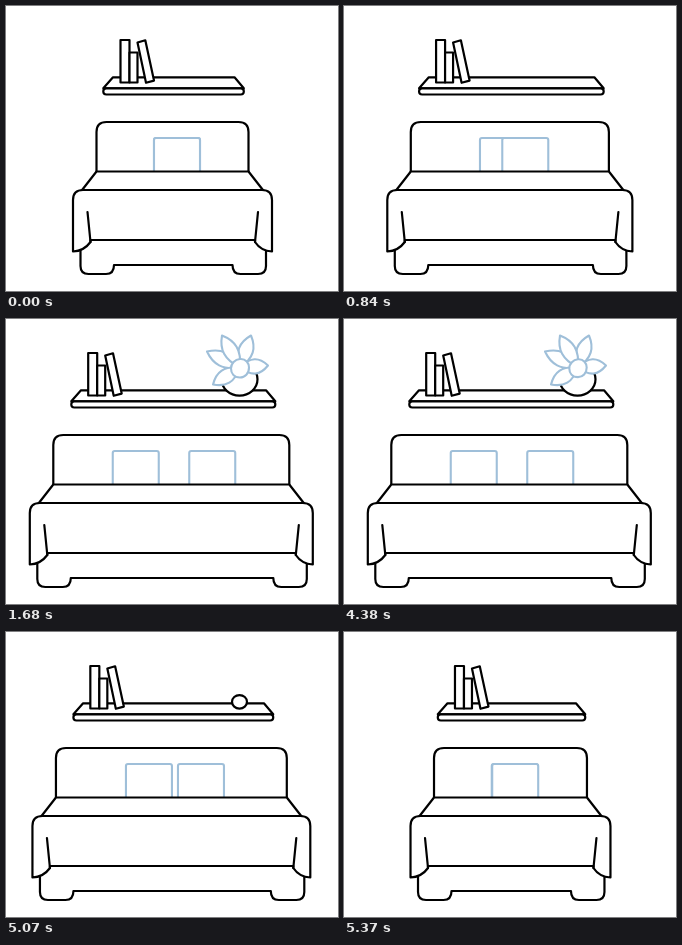
Write an HTML page that moves like this. It is 332 px wide and 285 px high and loops after 5400 ms.

```html
<!DOCTYPE html>
<html lang="en">
<head>
<meta charset="utf-8">
<title>Growing bed</title>
<style>
  html, body { margin: 0; height: 100%; overflow: hidden; background: #fff; }
  svg { display: block; width: 100%; height: 100%; }
  path, ellipse, rect { fill: #fff; stroke: #000; stroke-width: 2.2; stroke-linejoin: round; stroke-linecap: round; }
  .line { fill: none; }
  .blue { stroke: #9fbfd9; stroke-width: 2.1; }
</style>
</head>
<body>
<svg viewBox="0 0 332 285">
  <path id="shelf"/>
  <rect id="slab" y="82.3" height="6.2" rx="3"/>
  <g id="books">
    <path d="M114.5 34H123.5V76.5H114.5Z"/>
    <path d="M123.5 46.5H131.5V76.5H123.5Z"/>
    <path d="M131.5 36.5L139.3 34.3L148 74.6L140 76.8Z"/>
  </g>
  <ellipse id="pot" cx="233.5"/>
  <g id="plant"></g>
  <path id="head"/>
  <path id="left" class="blue" d="M-23 165V134Q-23 132 -21 132H21Q23 132 23 134V165"/>
  <path id="right" class="blue" d="M-23 165V134Q-23 132 -21 132H21Q23 132 23 134V165"/>
  <path id="mattress"/>
  <path id="base"/>
  <path id="cover"/>
  <path id="folds" class="line"/>
</svg>
<script>
const LOOP = 5400, STEP = 30, MIRROR = 6030;
const $ = id => document.getElementById(id);
const clamp = x => Math.min(1, Math.max(0, x));
const span = (t, start, length) => clamp((t - start) / length);
const inOut = p => p < .5 ? 2 * p * p : 1 - 2 * (1 - p) ** 2;
const sineOut = p => Math.sin(p * Math.PI / 2);
const draw = (id, d) => $(id).setAttribute('d', d);
const move = (el, x, y, rest = '') => el.setAttribute('transform', `translate(${x} ${y})${rest}`);

// Leaf tips relative to the heart of the plant, back to front
const leaves = [[-33, -16], [28, -2], [-27, 17], [11, -32], [-18, -32]].map(([x, y]) => {
  const size = Math.hypot(x, y), turn = Math.atan2(y, x) * 180 / Math.PI;
  return { turn, d: `M0 0C${size * .4} -10 ${size * .7} -9 ${size} 0C${size * .7} 9 ${size * .4} 10 0 0Z` };
});
leaves.push({ turn: 0, d: 'M0 -8.5C6 -9 9 -4 9 0C9 6 5 10 0 10C-6 10 -9 6 -9 1C-9 -4 -5 -8 0 -8.5Z' });
for (const leaf of leaves) {
  leaf.el = document.createElementNS('http://www.w3.org/2000/svg', 'path');
  leaf.el.setAttribute('class', 'blue');
  leaf.el.setAttribute('d', leaf.d);
  $('plant').append(leaf.el);
}

function drawBed(p) {
  const l = x => x - 43.2 * p, r = x => x + 40.8 * p;
  draw('head', `M${l(90.5)} 165.5V126Q${l(90.5)} 116 ${l(100.5)} 116H${r(232.5)}Q${r(242.5)} 116 ${r(242.5)} 126V165.5`);
  draw('mattress', `M${l(90.5)} 165.5H${r(242.5)}L${r(258.5)} 186H${l(74.5)}Z`);
  draw('base', `M${l(74.5)} 240V260Q${l(74.5)} 268 ${l(82.5)} 268H${l(100)}Q${l(108)} 268 ${l(108)} 259`
    + `H${r(226.5)}Q${r(226.5)} 268 ${r(234.5)} 268H${r(252)}Q${r(260)} 268 ${r(260)} 260V240`);
  draw('cover', `M${l(67)} 245.5V194Q${l(67)} 184 ${l(77)} 184H${r(256)}Q${r(266)} 184 ${r(266)} 194V245.5`
    + `Q${r(255)} 245 ${r(249)} 236V234H${l(84.5)}V236Q${l(78)} 245 ${l(67)} 245.5Z`);
  draw('folds', `M${l(81.5)} 206L${l(84.5)} 236M${r(252)} 206L${r(249)} 236`);
}

function drawShelf(p) {
  const a = 97.3 - 32 * p, b = 237.8 + 31.5 * p;
  draw('shelf', `M${a} 82.3L${a + 9.7} 71.3H${b - 9.3}L${b} 82.3Z`);
  $('slab').setAttribute('x', a);
  $('slab').setAttribute('width', b - a);
  move($('books'), -32.3 * p, 0);
}

function render(time) {
  const t = time < LOOP / 2 ? time : MIRROR - time;
  drawBed(inOut(span(t, 630, 400)));
  drawShelf(sineOut(span(t, 630, 430)));

  const apart = inOut(span(t, 630, 550));
  move($('left'), 171 - 41.25 * apart, 0);
  move($('right'), 171 + 35.25 * apart, 0);

  const grow = sineOut(span(t, 870, 330)), pot = $('pot');
  pot.setAttribute('rx', 18 * grow);
  pot.setAttribute('ry', 16.3 * grow);
  pot.setAttribute('cy', 76.6 - 16.3 * grow);
  pot.style.display = grow ? '' : 'none';

  leaves.forEach(({ el, turn }, i) => {
    const size = inOut(span(t, 1200 + i * 50, 230));
    el.style.display = size ? '' : 'none';
    el.style.strokeWidth = 2.1 / Math.max(size, .05);
    move(el, 234, 48.5, ` rotate(${turn}) scale(${size})`);
  });
}

const start = performance.now();
function tick() {
  const time = (performance.now() - start) % LOOP;
  render(Math.floor(time / STEP) * STEP);
  requestAnimationFrame(tick);
}
tick();
</script>
</body>
</html>
```
